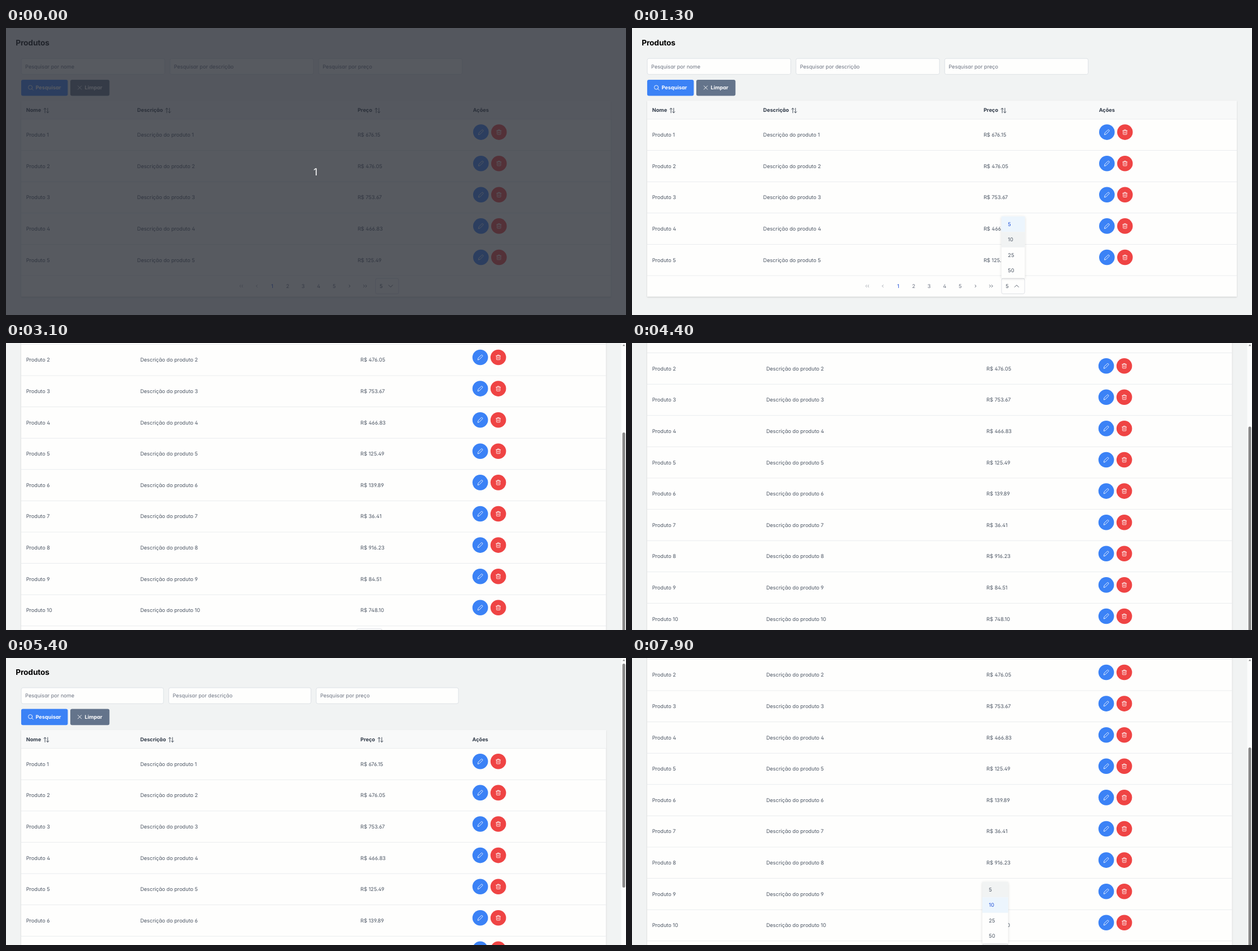
These frames come from a looping animation (1099 by 510 pixels, 8 s). An HTML page:

```html
<!DOCTYPE html>
<html lang="pt">
<head>
<meta charset="utf-8">
<title>Produtos</title>
<style>
  html, body { margin: 0; width: 100%; height: 100%; overflow: hidden; background: #f1f3f3; }
  svg {
    display: block; font: 9.16px Inter, "Open Sans", sans-serif;
    font-feature-settings: "cv02", "cv03", "cv04", "cv11";
    text-rendering: geometricPrecision; white-space: pre;
  }
  .bold { font-weight: 700; }
  .title { font-size: 13.74px; letter-spacing: -.01em; }
  .count { font-size: 17.5px; font-feature-settings: normal; }
  .icon { fill: none; stroke-linecap: round; stroke-linejoin: round; }
  .card { filter: drop-shadow(0 1px 1.2px rgba(0, 0, 0, .17)); }
  .panel { filter: drop-shadow(0 1px 2px rgba(0, 0, 0, .14)); }
</style>
</head>
<body>
<svg id="stage" width="1099" height="510" viewBox="0 0 1099 510"></svg>
<script>
const stage = document.getElementById('stage');
const LOOP = 8000, ROW = 55.6, HEAD = 162, ITEM = 27.45;
const WHITE = '#fefefd', BLUE = '#3b82f6', GREY = '#64748b', RED = '#ef4444';
const INK = '#4b5563', DARK = '#303a48', LINK = '#1d4ed8', LINE = '#e5e8eb';
const prices = ['676.15', '476.05', '753.67', '466.83', '125.49',
                '139.89', '36.41', '916.23', '84.51', '748.10'];
const sizes = [5, 10, 25, 50];

// Each track holds a value from its time on: [ms, value]
const tracks = {
  veil: [[0, 1], [100, .45], [200, 0]],
  rows: [[0, 5], [1800, 10]],
  scroll: [[0, 0], [2300, 25], [2500, 137.7], [2800, 160], [2900, 187], [3000, 208], [3100, 215.2],
           [4400, 200], [4600, 128], [4700, 66], [4800, 29.8], [4900, 10], [5000, 0],
           [5400, 1.3], [5500, 92], [5600, 215.2]],
  panel: [[0, 0], [600, .3], [700, .85], [800, 1], [1800, .4], [1900, 0],
          [6300, .3], [6400, .85], [6500, 1]],
  ring: [[0, 0], [600, .5], [700, 1], [1000, .5], [1100, 0], [6300, 1], [6600, 0]],
  focus: [[0, 1], [1000, .5], [1100, 0], [6300, 1], [6600, 0], [7000, 1], [7800, .5], [7900, 0]],
  hover: [[0, -1], [1000, 1], [6300, -1], [6600, 3], [6800, 2], [7000, -1], [7800, 0]]
};
const stateAt = t => Object.fromEntries(Object.entries(tracks).map(
  ([name, keys]) => [name, keys.filter(k => k[0] <= t).pop()[1]]));

const rect = (x, y, w, h, fill, extra = '') =>
  `<rect x="${x}" y="${y}" width="${w}" height="${h}" fill="${fill}" ${extra}/>`;
const text = (x, y, s, fill = INK, extra = '') =>
  `<text x="${x}" y="${y + 3.3}" fill="${fill}" ${extra}>${s}</text>`;
const icon = (x, y, d, color, width = .9) =>
  `<path class="icon" transform="translate(${x} ${y})" d="${d}" stroke="${color}" stroke-width="${width}"/>`;
const bold = 'class="bold"', middle = 'text-anchor="middle"';

const SORT = 'M2.4 4.2V-4.2M.3-2.1L2.4-4.2L4.5-2.1M7.2-4.2V4.2M5.1 2.1L7.2 4.2L9.3 2.1';
const SEARCH = 'M3.1-.5A3.6 3.6 0 1 1-4.1-.5A3.6 3.6 0 1 1 3.1-.5M2.2 2L4.6 4.4';
const CROSS = 'M-3.2-3.2L3.2 3.2M3.2-3.2L-3.2 3.2';
const PENCIL = 'M-4.2 4.2L-3.6 1.2L2-4.1Q2.9-4.6 3.7-3.8Q4.6-2.9 4.1-2L-1.3 3.5Z';
const TRASH = 'M-4-2.7H4M-3.2-2.7V3.4Q-3.2 4.2-2.4 4.2H2.4Q3.2 4.2 3.2 3.4V-2.7' +
              'M-1.6-2.7V-4.2H1.6V-2.7M-1.1-.4V2.1M1.1-.4V2.1';
const chevron = (x, y, dir) => icon(x, y, `M-3.6 ${-1.8 * dir}L0 ${1.8 * dir}L3.6 ${-1.8 * dir}`, INK);
const angle = (x, y, dir) => icon(x, y, `M${-dir}-1.9L${dir} 0L${-dir} 1.9`, INK);

function filters(wide) {
  const step = wide ? 263.6 : 261.4;
  const fields = ['nome', 'descrição', 'preço'].map((name, i) => {
    const x = 27.1 + i * step;
    return rect(x, 54.2, step - 9.3, 28.2, WHITE, 'rx="3" stroke="#d3d8de" stroke-width=".7"') +
      text(x + 7, 68.3, 'Pesquisar por ' + name, '#6b7280');
  });
  return text(17.2, 27.7, 'Produtos', '#000', 'class="bold title"') + fields.join('') +
    rect(26.9, 91.9, 82.6, 28.6, BLUE, 'rx="3.2"') + icon(43.6, 106, SEARCH, '#fff') +
    text(52.5, 106, 'Pesquisar', '#fff', bold) +
    rect(114, 91.9, 69.4, 28.6, GREY, 'rx="3.2"') + icon(130.6, 106, CROSS, '#fff') +
    text(139.5, 106, 'Limpar', '#fff', bold);
}

function table(count, wide, right) {
  const cols = wide ? [35.7, 232.6, 623.2, 827.7] : [35.7, 237.9, 628.3, 826.5];
  const bottom = HEAD + count * ROW, width = right - 26.9;
  const heads = ['Nome', 'Descrição', 'Preço', 'Ações'], sortGap = [31, 50, 30.6];
  let out = rect(26.9, 129.4, width, bottom + 37.5 - 129.4, WHITE, 'class="card"') +
    rect(26.9, 129.4, width, HEAD - 129.4, '#f8f9f9');
  heads.forEach((h, i) => {
    out += text(cols[i], 145.7, h, DARK, bold);
    if (i < 3) out += icon(cols[i] + sortGap[i], 146.6, SORT, DARK);
  });
  for (let r = 0; r <= count; r++) out += rect(26.9, HEAD + r * ROW - .4, width, .8, LINE);
  for (let r = 0; r < count; r++) {
    const y = HEAD + r * ROW, mid = y + 27.8, x = cols[3] + 14.1;
    out += text(cols[0], mid, `Produto ${r + 1}`) + text(cols[1], mid, `Descrição do produto ${r + 1}`) +
      text(cols[2], mid, 'R$ ' + prices[r]);
    [[BLUE, PENCIL], [RED, TRASH]].forEach(([color, shape], i) => {
      out += `<circle cx="${x + i * 32}" cy="${y + 23.1}" r="13.8" fill="${color}"/>` +
        icon(x + i * 32, y + 23.1, shape, '#fff', .85);
    });
  }
  return out;
}

function paginator(s, bottom) {
  const few = s.rows === 5, left = few ? 655 : 621.4, pages = few ? 5 : 3;
  const y = bottom + 18.6, first = left - 18.5 - (pages + 1) * 27.45;
  let out = '';
  for (let p = 1; p <= pages; p++)
    out += text(first + (p - 1) * 27.45, y, p, p === 1 ? LINK : '#6b7280', middle);
  const back = first - 27.45, next = first + pages * 27.45;
  out += `<g opacity=".6">${angle(back - 29.2, y, -1)}${angle(back - 25.6, y, -1)}${angle(back, y, -1)}</g>` +
    angle(next, y, 1) + angle(next + 25.7, y, 1) + angle(next + 29.3, y, 1);
  const w = few ? 41 : 45.2, box = 'rx="3" stroke-width=';
  out += rect(left, bottom + 5, w, 27.4, WHITE, box + '".7" stroke="#d1d5db"');
  if (s.ring) out += `<g opacity="${s.ring}">` +
    rect(left, bottom + 5, w, 27.4, 'none', box + '"2.4" stroke="#bfdbfe"') +
    rect(left, bottom + 5, w, 27.4, 'none', box + '".7" stroke="' + BLUE + '"') + '</g>';
  return out + text(left + 7.3, y + .4, s.rows) + chevron(left + w - 14.2, y, s.panel ? -1 : 1);
}

function options(s, t) {
  if (!s.panel) return '';
  const early = t < 4000, left = early ? 654.8 : 621, width = early ? 41.6 : 45.8;
  const top = early ? 334.8 : 397.8, base = top + 4 * ITEM;
  const chosen = sizes.indexOf(s.rows);
  const mix = (a, b) => Math.round(a + (b - a) * s.focus);
  let out = rect(left, top, width, 4 * ITEM, WHITE, 'class="panel" rx="2"');
  sizes.forEach((n, i) => {
    const y = top + i * ITEM;
    if (i === chosen) out += rect(left, y, width, ITEM, `rgb(${mix(236, 208)},${mix(245, 225)},253)`);
    else if (i === s.hover) out += rect(left, y, width, ITEM, '#f1f3f3');
    out += text(left + 11.5, y + ITEM / 2, n, i === chosen ? LINK : INK);
  });
  const scale = early && t >= 1800 ? 1 : .8 + .2 * s.panel;
  return `<g opacity="${s.panel}" transform="translate(0 ${base * (1 - scale)}) scale(1 ${scale})">${out}</g>`;
}

function scrollbar(scroll) {
  return rect(1090.6, 0, 8.4, 510, '#fbfcfc') +
    '<path d="M1092.9 5.2L1095.2 2.4L1097.5 5.2Z" fill="#858585"/>' +
    rect(1092.6, 9.1 + .697 * scroll, 5, 398, '#888', 'rx="2.5"');
}

function veil(opacity) {
  return opacity ? `<g opacity="${opacity}">${rect(0, 0, 1099, 510, '#282c35', 'opacity=".78"')}` +
    text(548.6, 258.4, '1', '#fff', 'class="count" ' + middle) + '</g>' : '';
}

function draw(t) {
  const s = stateAt(t), wide = s.rows === 5;
  const page = filters(wide) + table(s.rows, wide, wide ? 1072.1 : 1063.6) +
    paginator(s, HEAD + s.rows * ROW);
  stage.innerHTML = rect(0, 0, 1099, 510, '#f1f3f3') +
    `<g transform="translate(0 ${-s.scroll})">${page}</g>` +
    options(s, t) + (wide ? '' : scrollbar(s.scroll)) + veil(s.veil);
}

const start = performance.now();
let shown = -1;
function tick() {
  // All changes fall on tenths of a second
  const t = Math.floor((performance.now() - start) % LOOP / 100) * 100;
  if (t !== shown) draw(shown = t);
  requestAnimationFrame(tick);
}
tick();
</script>
</body>
</html>
```
